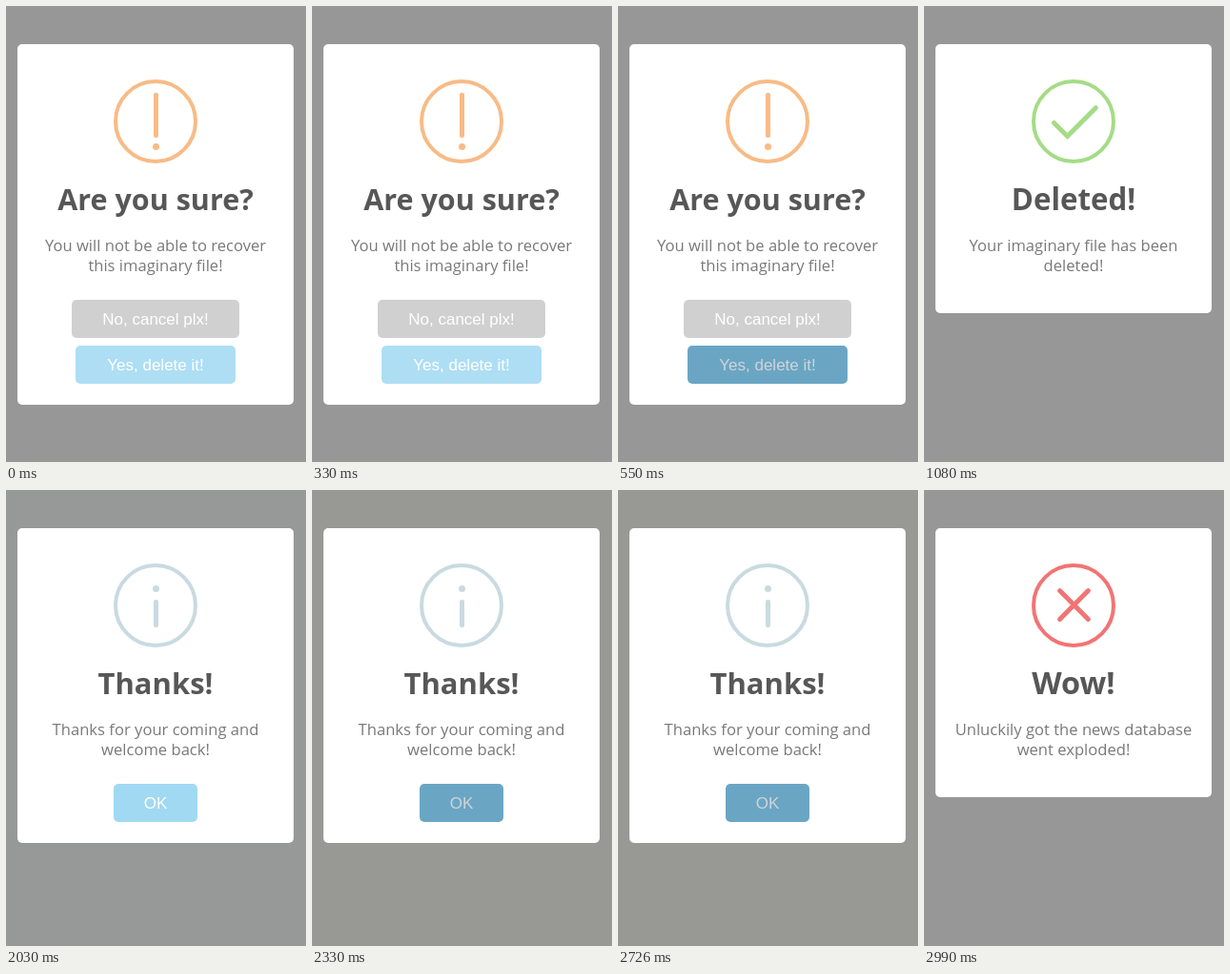
An HTML page for the animation above (3540 ms loop, 315x478 px).

```html
<!DOCTYPE html>
<html lang="en">
<head>
<meta charset="utf-8">
<title>Alert dialogs</title>
<style>
  html, body { margin: 0; width: 100%; height: 100%; overflow: hidden; background: #979797; }
  svg { display: block; width: 100%; height: 100%; }
  text { text-anchor: middle; font-family: "Open Sans", "Noto Sans", sans-serif; }
  .title { font-weight: 700; fill: #575757; }
  .body { font-size: 16.6px; fill: #797979; }
  .label { font: 17px "Liberation Sans", Arial, sans-serif; }
  .icon { fill: none; stroke-width: 5; stroke-linecap: round; }
</style>
</head>
<body>
<svg id="stage" viewBox="0 0 315 478"></svg>
<script>
const LOOP = 3540;
const MID = 157;
const stage = document.getElementById("stage");

const rect = (x, y, w, h, r, fill) =>
  `<rect x="${x}" y="${y}" width="${w}" height="${h}" rx="${r}" fill="${fill}"/>`;
const text = (cls, y, str, attrs = "") =>
  `<text class="${cls}" x="${MID}" y="${y}" ${attrs}>${str}</text>`;
const dot = (y, fill) => `<circle cx="157.5" cy="${y}" r="3.5" fill="${fill}"/>`;
const stroke = (d, color) => `<path class="icon" d="${d}" stroke="${color}"/>`;

const icons = {
  warning: { color: "#f8bb86", mark: c => rect(155, 91, 5, 47, 2, c) + dot(147.5, c) },
  success: { color: "#a5dc86", mark: c => stroke("M136.4 122.4L150.6 136.5L180.4 106.7", c) },
  info: { color: "#c9dae1", mark: c => rect(155, 115, 5, 29, 2, c) + dot(103.5, c) },
  error: { color: "#f27474", mark: c =>
    stroke("M142.6 105.6L172.4 135.4M172.4 105.6L142.6 135.4", c) }
};

const looks = {
  cancel: ["#d0d0d0", "#fff"],
  idle: ["#aedef4", "#fff"],
  hover: ["#a1d9f2", "#fff"],
  pressed: ["#6aa6c4", "#d0d4d6"]
};

function button({ y, w, label, look }) {
  const [fill, ink] = looks[look];
  return rect(MID - w / 2, y, w, 40, 5, fill) +
    text("label", y + 26 - 0.5, label, `fill="${ink}"`);
}

function dialog({ back = "#979797", height, icon, title, size, lines, buttons = [] }) {
  const { color, mark } = icons[icon];
  return rect(0, 0, 315, 478, 0, back) +
    rect(12, 40, 290, height, 5, "#fff") +
    `<circle cx="${MID}" cy="121" r="42" fill="none" stroke="${color}" stroke-width="4"/>` +
    mark(color) +
    text("title", 214, title, `font-size="${size}"`) +
    lines.map((s, i) => text("body", 257 + 21 * i, s)).join("") +
    buttons.map(button).join("");
}

const confirm = look => dialog({
  height: 378, icon: "warning", title: "Are you sure?", size: 30.5,
  lines: ["You will not be able to recover", "this imaginary file!"],
  buttons: [
    { y: 308, w: 176, label: "No, cancel plx!", look: "cancel" },
    { y: 356, w: 168, label: "Yes, delete it!", look }
  ]
});

const thanks = (look, back) => dialog({
  back, height: 330, icon: "info", title: "Thanks!", size: 31,
  lines: ["Thanks for your coming and", "welcome back!"],
  buttons: [{ y: 308, w: 88, label: "OK", look }]
});

const scenes = [
  { at: 0, view: confirm("idle") },
  { at: 550, view: confirm("pressed") },
  { at: 1080, view: dialog({
    height: 282, icon: "success", title: "Deleted!", size: 31.3,
    lines: ["Your imaginary file has been", "deleted!"]
  }) },
  { at: 2030, view: thanks("hover", "#969997") },
  { at: 2330, view: thanks("pressed", "#989895") },
  { at: 2990, view: dialog({
    height: 282, icon: "error", title: "Wow!", size: 32.5,
    lines: ["Unluckily got the news database", "went exploded!"]
  }) }
];

let shown = null;
function render(time) {
  const t = time % LOOP;
  const scene = scenes.filter(s => s.at <= t).pop();
  if (scene !== shown) {
    stage.innerHTML = scene.view;
    shown = scene;
  }
}

const start = performance.now();
function tick() {
  render(performance.now() - start);
  requestAnimationFrame(tick);
}
tick();
</script>
</body>
</html>
```
